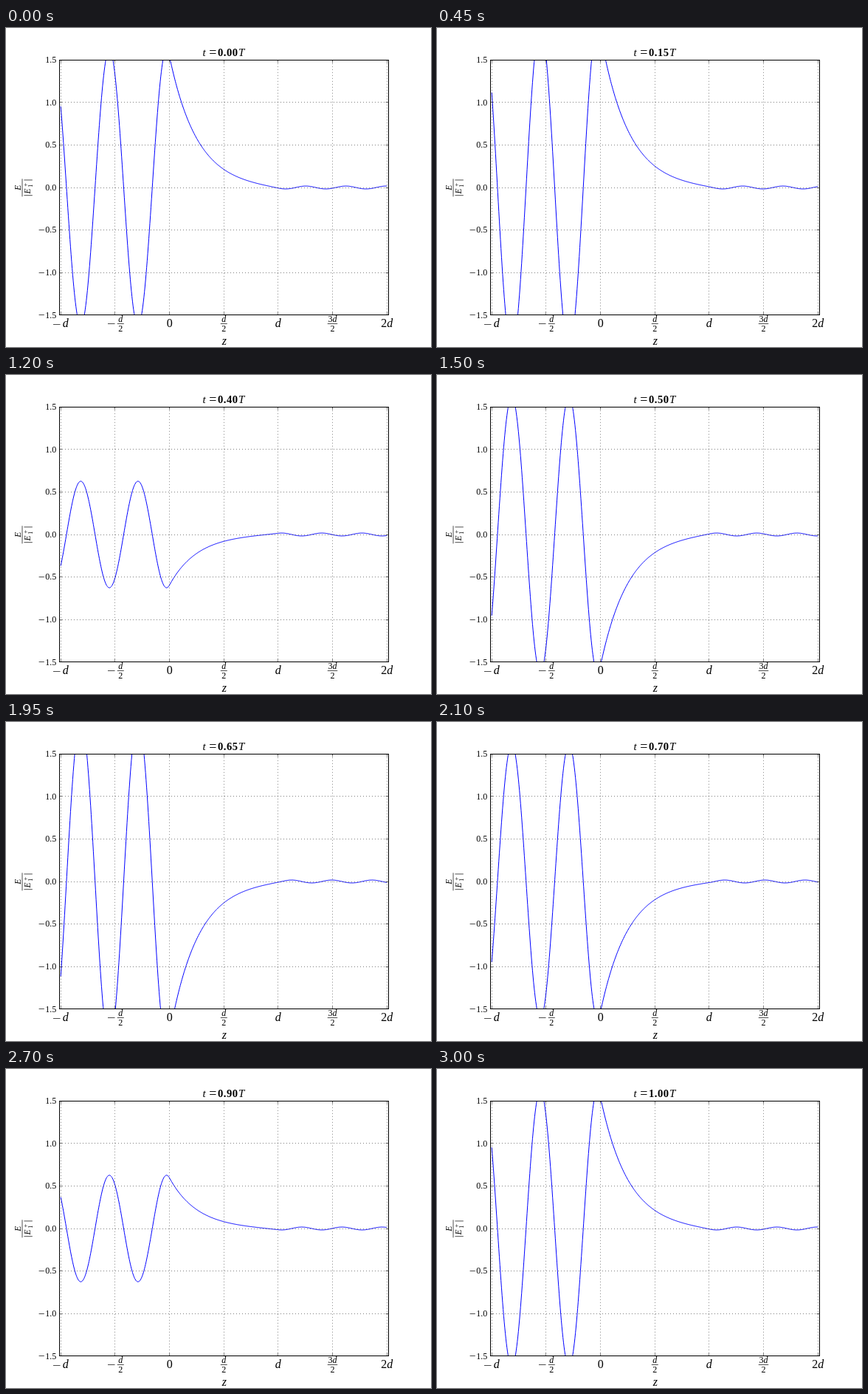
An HTML page that plays this animation: 576 px wide and 432 px high, repeating every 3.15 s.

```html
<!DOCTYPE html>
<html lang="en">
<head>
<meta charset="utf-8">
<title>Wave through a barrier</title>
<style>
  html, body { margin: 0; width: 100%; height: 100%; overflow: hidden; background: #fff; }
  svg { display: block; width: 576px; height: 432px; }
  text { font-family: "Liberation Serif", serif; fill: #000; }
  .it { font-style: italic; }
  .grid { stroke: #000; stroke-width: .5; stroke-dasharray: 1 3; }
  .tick { stroke: #000; stroke-width: .5; }
  .rule { stroke: #000; stroke-width: .7; }
</style>
</head>
<body>
<svg id="stage" viewBox="0 0 576 432">
  <defs><clipPath id="box"><rect x="72" y="43.2" width="446.4" height="345.6"/></clipPath></defs>
</svg>
<script>
const svg = document.getElementById('stage');
const LEFT = 72, RIGHT = 518.4, TOP = 43.2, BOTTOM = 388.8;
const D = 147.33, X0 = 221.53, Y0 = 216, UNIT = 115.2;
const STEP = 150, STEPS = 21;

function add(tag, attrs, content, parent = svg) {
  const el = document.createElementNS('http://www.w3.org/2000/svg', tag);
  for (const key in attrs) el.setAttribute(key, attrs[key]);
  if (content) el.textContent = content;
  parent.appendChild(el);
  return el;
}
const line = (cls, x1, y1, x2, y2, parent) => add('line', { class: cls, x1, y1, x2, y2 }, '', parent);
const label = (s, x, y, size, anchor = 'middle', cls = '', parent = svg) =>
  add('text', { x, y, 'font-size': size, 'text-anchor': anchor, class: cls }, s, parent);
const snap = v => Math.floor(v) + .5;

// Wave numbers per barrier width, and the phase of the standing wave
const K1 = 11.94, KAPPA = 3.91, K3 = 17, PSI = .624;
const PHI = Math.atan(KAPPA / K1), Q = K3 / KAPPA;
const OUT = 2 * Math.cos(PHI) / Math.hypot(Math.cosh(KAPPA), Q * Math.sinh(KAPPA));
const TAU = PSI + Math.atan(Q * Math.tanh(KAPPA));

function field(z, wt) {
  if (z < 0) return 2 * Math.cos(K1 * z + PHI) * Math.cos(wt - PSI);
  const u = z - 1, p = TAU - wt;
  if (u > 0) return OUT * Math.cos(K3 * u + p);
  return OUT * (Math.cosh(KAPPA * u) * Math.cos(p) - Q * Math.sinh(KAPPA * u) * Math.sin(p));
}

const curve = add('path', {
  fill: 'none', stroke: '#00f', 'stroke-width': 1, 'stroke-linejoin': 'round', 'clip-path': 'url(#box)'
});

// Vertical grid and ticks
for (let i = -2; i <= 4; i++) {
  const x = snap(X0 + i * D / 2);
  line('grid', x, BOTTOM, x, TOP);
  line('tick', x, BOTTOM, x, BOTTOM - 4);
  line('tick', x, TOP, x, TOP + 4);
}

// Horizontal grid, ticks and numbers
for (let i = -3; i <= 3; i++) {
  const v = i / 2, exact = Y0 - v * UNIT, y = snap(exact);
  line('grid', LEFT, y, RIGHT, y);
  line('tick', LEFT, y, LEFT + 4, y);
  line('tick', RIGHT, y, RIGHT - 4, y);
  label(Math.abs(v).toFixed(1), 68.2, exact + 3.8, 12, 'end');
  if (v < 0) line('rule', 44.6, y, 51.8, y);
}
add('rect', { x: 72.5, y: 43.5, width: 446, height: 345, fill: 'none', stroke: '#000' });

// Labels below the horizontal axis
function fraction(x, top, width) {
  const num = label('', x, 397.6, 12);
  if (top.length > 1) add('tspan', {}, top[0], num);
  add('tspan', { class: 'it' }, 'd', num);
  line('rule', x - width / 2, 400.5, x + width / 2, 400.5);
  label('2', x, 411, 12);
}
line('rule', 64, 401.5, 73.5, 401.5);
label('d', 80.8, 405.3, 16, 'middle', 'it');
line('rule', 138, 400.5, 147.5, 400.5);
fraction(155.3, 'd', 9);
label('0', 221.8, 405.3, 16);
fraction(295.3, 'd', 9);
label('d', 368.8, 405.3, 16, 'middle', 'it');
fraction(442.5, '3d', 13.5);
const last = label('2', 516.3, 405.3, 16);
add('tspan', { class: 'it' }, 'd', last);
label('z', 295.8, 429, 16, 'middle', 'it');

// Vertical axis label, turned upright
const side = add('g', { transform: 'translate(22 216.3) rotate(-90)' });
label('E', 0, -1.9, 11.5, 'middle', 'it', side);
line('rule', -12, 0, 12, 0, side);
line('rule', -10.4, 2.4, -10.4, 13.8, side);
label('E', -4.6, 11.4, 11.5, 'middle', 'it', side);
label('+', 4.2, 7, 9, 'middle', '', side);
label('1', 2.6, 14, 8, 'middle', '', side);
line('rule', 10.4, 2.4, 10.4, 13.8, side);

// Title
label('t', 266.6, 38, 15, 'start', 'it');
label('=', 275.2, 38.6, 18, 'start');
const clock = label('', 287, 38, 14.6, 'start');
clock.setAttribute('font-weight', 'bold');
clock.setAttribute('letter-spacing', '.5');
label('T', 315, 38, 15, 'start', 'it');

function draw(ms) {
  const t = Math.floor(ms / STEP) % STEPS / 20;
  const points = [];
  for (let i = 0; i <= 600; i++) {
    const z = i / 200 - 1;
    points.push((X0 + z * D).toFixed(2) + ' ' + (Y0 - UNIT * field(z, 2 * Math.PI * t)).toFixed(2));
  }
  curve.setAttribute('d', 'M' + points.join('L'));
  clock.textContent = t.toFixed(2);
}

const start = performance.now();
function tick() {
  draw(performance.now() - start);
  requestAnimationFrame(tick);
}
tick();
</script>
</body>
</html>
```
